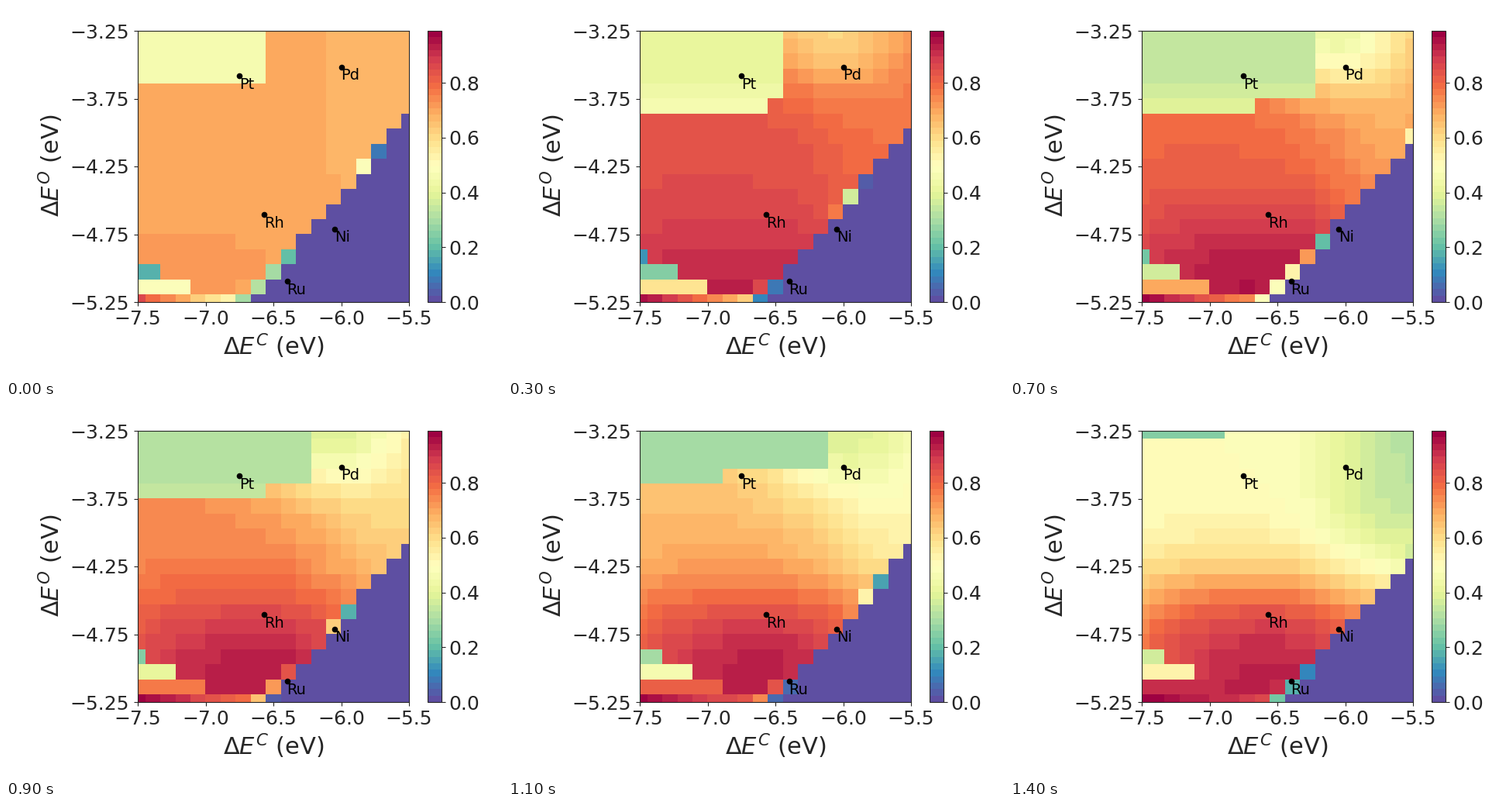
Recreate the animation shown at these times as a matplotlib script. Size 640 by 480 pixels, loop 1.5 s.

```python
import numpy as np
import matplotlib.pyplot as plt
from matplotlib.animation import FuncAnimation

W, H, DPI = 640, 480, 100
INK = "#262626"
FRAMES = 15
N = 19                                   # samples along each axis
VMAX = 0.99
ROW, COL = np.mgrid[0:N, 0:N].astype(float)   # row 0 is the top

plt.rcParams.update({
    "font.family": "DejaVu Sans", "text.color": INK, "axes.edgecolor": INK,
    "xtick.color": INK, "ytick.color": INK,
    "xtick.labelsize": 18, "ytick.labelsize": 18,
})


def sigmoid(x):
    return 1 / (1 + np.exp(-x))


def bell(x, centre, width):
    return np.exp(-((x - centre) / width) ** 2)


def plateau(t, rise):
    """Warm surface: cooler on top, hotter below, fading to the right."""
    low = 0.71 + 0.17 * rise - 0.38 * t ** 2.3
    high = 0.72 + 0.26 * rise
    lower = sigmoid((ROW - 14.2 + 4 * t) / 1.6)
    z = low + (high - low) * lower
    z -= (0.04 + 0.14 * t) * sigmoid((COL - 13) / 1.5)
    z -= 0.18 * t * lower * np.exp(-COL / 4)
    z -= 0.33 * np.sin(np.pi * t) * bell(ROW, 0, 4) * bell(COL, 12, 5)
    return z


def upper_pocket(t):
    """Mask and level of the low zone in the upper left."""
    depth = 4.2 + 10.3 * t - 13 * t ** 2 - 0.17 * t * COL
    mask = (ROW + 0.5 < depth) & (COL + 0.5 < 9.4 + 4.6 * t)
    return mask, 0.46 - 0.22 * t + 0.025 * np.maximum(ROW - 3, 0)


def lower_pocket(t):
    """Mask and level of the low steps in the lower left."""
    step = ROW - 15
    mask = (step >= 0) & (step < 3) & (COL + 0.5 < 0.2 + 1.7 * t + 2 * step)
    return mask, 0.08 + 0.1 * step ** 2 + (0.28 + 0.08 * step) * t


def coverage(t):
    """Share of each cell left of the dead zone, softer near the bottom."""
    front = 13 + 2 * t ** 0.75 - (0.85 + 0.05 * t) * (ROW - 12)
    soft = np.clip((ROW - 15) / 2, 0, 1)
    return sigmoid((front - COL - 0.5 - 0.3 * soft) / (0.05 + 0.15 * soft))


def field(i):
    t = i / (FRAMES - 1)
    rise = 1 - np.exp(-10 * t)
    bottom_row = 0.86 + 0.13 * rise - (0.055 - 0.042 * t) * COL
    z = np.where(ROW == N - 1, bottom_row, plateau(t, rise))
    for mask, level in (upper_pocket(t), lower_pocket(t)):
        z = np.where(mask, level, z)
    return np.clip(z * coverage(t), 0, 1) * VMAX


def box(x, y, w, h):
    return [x / W, 1 - (y + h) / H, w / W, h / H]


fig = plt.figure(figsize=(W / DPI, H / DPI), dpi=DPI, facecolor="white")
ax = fig.add_axes(box(170, 32, 350, 350))
cax = fig.add_axes(box(544, 32, 18, 350))

half = 1 / (N - 1)
image = ax.imshow(field(0), cmap=plt.get_cmap("Spectral_r", 42), vmin=0, vmax=VMAX,
                  interpolation="nearest", aspect="auto",
                  extent=[-7.5 - half, -5.5 + half, -5.25 - half, -3.25 + half])
ax.set(xlim=(-7.5, -5.5), ylim=(-5.25, -3.25),
       xticks=np.arange(-7.5, -5.4, 0.5), yticks=np.arange(-5.25, -3.2, 0.5))
ax.xaxis.set_major_formatter("{x:.1f}")
ax.yaxis.set_major_formatter("{x:.2f}")
ax.tick_params(axis="y", pad=4.5)
fig.colorbar(image, cax=cax, ticks=np.arange(0, 0.9, 0.2), format="{x:.1f}")

fig.text(345 / W, 1 - 450.5 / H, r"$\Delta E^C$ (eV)", size=22,
         ha="center", va="baseline")
fig.text(69 / W, 1 - 206 / H, r"$\Delta E^O$ (eV)", size=22, rotation=90,
         rotation_mode="anchor", ha="center", va="baseline")

METALS = {"Pt": (-6.75, -3.584), "Pd": (-6.0, -3.516), "Rh": (-6.57, -4.607),
          "Ni": (-6.05, -4.71), "Ru": (-6.4, -5.098)}
for name, spot in METALS.items():
    ax.plot(*spot, "o", color="black", ms=5.5, mew=0)
    ax.annotate(name, spot, xytext=(0, -12.2), textcoords="offset points",
                color="black", size=14, ha="left", va="baseline")


def draw(i):
    image.set_data(field(i))
    return [image]


anim = FuncAnimation(fig, draw, frames=FRAMES, interval=100, repeat=True, repeat_delay=0)
plt.show()
```
